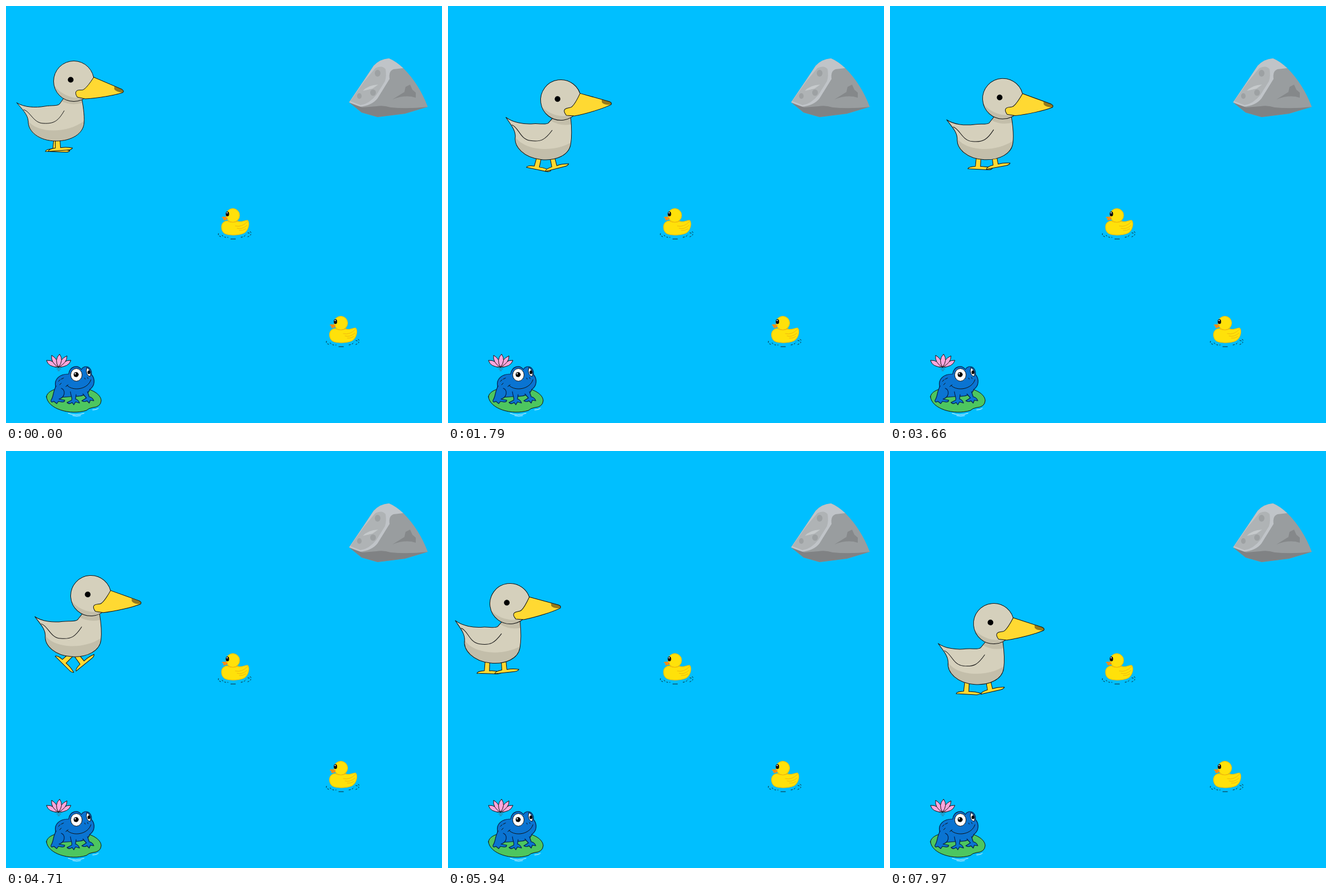
Recreate the animation shown at these times as an HTML page. Size 765 by 732 pixels, loop 8 s.

```html
<!DOCTYPE html>
<html lang="en">
<head>
<meta charset="utf-8">
<title>Duck pond</title>
<style>
  html, body { margin: 0; width: 100%; height: 100%; overflow: hidden; background: #00bfff; }
  svg { display: block; width: 100%; height: 100%; }
  .ink { stroke: #111; stroke-width: 1; stroke-linejoin: round; stroke-linecap: round; }
  .line { fill: none; }
  .cream { fill: #d5d0bc; }
  .shade { fill: #c3beaa; }
  .gold { fill: #ffd932; }
  .blue { fill: #0a74d2; stroke: #06204a; stroke-width: 1.2; }
  .pink { fill: #fda6dc; }
</style>
</head>
<body>
<svg viewBox="0 0 765 732">
  <defs>
    <path id="foot" class="ink gold" d="M-18 0 Q-17 -4 -5 -5 L-4 -23 H4 L4 -5 Q14 -6 25 -3 Q23 0 17 0 Z"/>
    <g id="duckling">
      <g fill="none" stroke="#10242c" stroke-dasharray="3 2.5">
        <path d="M373 399 Q371 403 377 405 M379 402 Q382 407 390 406 M412 406 Q420 405 421 400 M424 398 Q436 401 422 406 M428 396 L432 399"/>
        <path d="M394 409 H403" stroke-dasharray="none"/>
      </g>
      <g fill="#ffe10a" stroke="#f0b90a">
        <path d="M378 388 C378 380 384 377 390 377 L406 378 C414 380 419 376 424 376 C428 380 426 391 421 396 C416 403 390 404 383 399 Q378 395 378 388Z"/>
        <circle cx="398" cy="367.5" r="12"/>
        <path class="line" d="M389 378 Q399 382 408 377 M402 386 Q414 389 424 378 M405 390 Q414 393 423 385 M409 394 Q416 395 421 391"/>
      </g>
      <path d="M378 371 Q384 368 389 372 Q388 377 381 376 Q383 373 378 371Z" fill="#ff8c14"/>
      <ellipse cx="388.5" cy="365" rx="3" ry="4.3" fill="#111"/>
      <circle cx="388" cy="363" r="1.1" fill="#fff"/>
    </g>
  </defs>

  <g id="rock">
    <path fill="#999d9f" d="M602 169 L627 132 L645 105 Q656 93 672 92 Q684 97 697 109 Q725 137 740 177 L700 189 L652 195 L624 187Z"/>
    <path fill="#c0c4c8" d="M602 169 L627 132 L645 105 Q656 93 672 92 Q684 97 697 109 L680 111 Q671 114 673 128 L652 162 Q642 175 620 177Z"/>
    <path fill="#afb3b5" d="M604 167 L628 133 L648 109 Q660 103 666 111 Q668 122 665 132 L650 156 Q637 172 622 174Z"/>
    <path fill="#808284" d="M603 170 L625 178 L650 176 Q662 174 675 178 Q705 181 740 177 L700 189 L652 195 L624 187Z"/>
    <path fill="#85888a" d="M678 164 L699 151 L701 142 L709 138 L713 147 L719 152 V161 Q701 155 678 164Z"/>
    <path fill="#c6cacc" d="M626 149 Q635 139 653 138 L643 145Z"/>
    <g fill="#9da1a3">
      <ellipse cx="652" cy="118" rx="5" ry="6"/>
      <ellipse cx="644" cy="152" rx="5" ry="5.5"/>
      <ellipse cx="620" cy="158" rx="4" ry="5"/>
    </g>
  </g>

  <use href="#duckling"/>
  <use href="#duckling" x="189.5" y="189"/>

  <g id="frog" class="ink">
    <path d="M109 715 Q122 720 137 715 M117 719 Q124 721 131 719 M152 709 Q159 709 162 706" class="line" stroke="#e4f4ff"/>
    <path fill="#4dc65f" d="M71 686 C72 674 95 668 119 669 C148 669 167 681 167 693 Q166 704 152 705 Q145 706 141 710 C112 719 73 707 71 686Z"/>
    <path class="line" stroke="#506070" d="M86 634 H98 M89 637 H96 M91 640 H94"/>
    <g class="pink">
      <path d="M92 634 Q74 634 71 622 Q84 621 92 634Z"/>
      <path d="M92 634 Q110 634 114 622 Q102 621 92 634Z"/>
      <path d="M92 634 Q78 626 80 613 Q92 620 92 634Z"/>
      <path d="M92 634 Q108 626 107 614 Q94 620 92 634Z"/>
      <path d="M92 634 Q84 621 94 611 Q102 622 92 634Z"/>
    </g>
    <g class="blue">
      <path d="M87 668 C84 655 94 646 110 646 C112 632 126 629 132 638 C139 628 151 634 150 647 C157 655 156 667 147 673 C145 681 133 686 122 685 L96 687 Q86 684 87 668Z"/>
      <path d="M88 667 C82 677 84 685 79 692 Q78 697 84 694 L89 698 L92 694 Q103 697 103 692 L93 690 C105 686 104 674 97 671"/>
      <path d="M113 677 C114 686 117 689 115 692 L107 696 Q111 700 116 696 L119 700 L122 695 L129 697 Q127 691 122 690 L123 682"/>
      <path d="M135 681 L141 688 L133 693 Q138 696 142 693 L146 697 L148 692 L154 693 Q152 687 146 686 L143 677"/>
    </g>
    <path class="line" d="M107 666 C118 677 144 673 149 656 M105 668 L109 665 M138 653 L139 655 M143 652 L144 654 M92 659 L95 656 M97 655 L101 653 M94 665 L97 662"/>
    <ellipse cx="123.500" cy="647.500" rx="10" ry="11" fill="#fff"/>
    <path d="M142 635 Q150 639 148 650 Q142 650 141 641Z" fill="#fff"/>
    <circle cx="123" cy="647" r="4"/>
    <ellipse cx="145.500" cy="643" rx="2" ry="3"/>
    <circle cx="121.500" cy="645.500" r="1.200" fill="#fff" stroke="none"/>
  </g>

  <g id="duck">
    <use id="rear" href="#foot"/>
    <use id="front" href="#foot"/>
    <g id="body">
      <path class="cream" d="M19 170 C32 178 52 179 68 176 C80 174 90 176 94 172 L104 158 H132 C135 172 138 190 137 205 C136 224 115 237 88 237 C58 237 38 220 39 202 C38 190 28 181 19 170Z"/>
      <path class="shade" d="M39 202 C55 223 105 225 137 202 C137 224 115 237 88 237 C58 237 38 222 39 202Z"/>
      <path class="shade" d="M97 167 L104 158 H132 L134 170 Q115 176 97 167Z"/>
      <path class="ink line" d="M19 170 C32 178 52 179 68 176 C80 174 90 176 94 172 L104 158 H132 C135 172 138 190 137 205 C136 224 115 237 88 237 C58 237 38 220 39 202 C38 190 28 181 19 170Z M31 182 C43 185 48 206 66 206 C85 207 92 201 102 184"/>
    </g>
    <g id="head">
      <circle class="cream" cx="119" cy="132" r="35.500"/>
      <path class="shade" d="M84 139 A35.500 35.500 0 0 0 139 161 C116 164 97 156 84 139Z"/>
      <circle class="ink line" cx="119" cy="132" r="35.500"/>
      <circle cx="113.500" cy="129.500" r="5"/>
      <path class="gold" d="M154 125 L203 146 Q208 149 205 152 C190 157 160 162 139 163 L125 160 Q120 152 124 149 C128 146 134 149 137 146 Q143 142 154 125Z"/>
      <path fill="#94791d" d="M190 141 L203 146 Q208 149 205 152 Q193 151 190 146Z"/>
      <path class="ink line" d="M154 125 L203 146 Q208 149 205 152 C190 157 160 162 139 163 L125 160 Q120 152 124 149 C128 146 134 149 137 146 Q143 142 154 125Z"/>
    </g>
  </g>
</svg>
<script>
const LOOP = 8000, FPS = 13, HOME = [119, 132];

// tick, head centre x, y
const route = [
  [0, 119, 132], [3, 95, 101], [4, 117, 130], [5, 117, 130], [8, 93, 101], [10, 90, 103],
  [13, 92, 113], [17, 135, 128], [21, 184, 162], [23, 198, 165], [26, 236, 132], [27, 236, 132],
  [29, 230, 136], [31, 200, 122], [32, 200, 122], [34, 197, 136], [39, 172, 180], [43, 168, 163],
  [44, 184, 170], [45, 184, 170], [48, 205, 159], [49, 205, 159], [53, 157, 204], [54, 157, 204],
  [56, 175, 225], [58, 146, 250], [59, 146, 250], [61, 149, 254], [66, 110, 211], [70, 72, 229],
  [71, 74, 245], [72, 74, 245], [77, 109, 268], [81, 124, 284], [86, 110, 242], [90, 121, 277],
  [94, 152, 270], [99, 187, 314], [103, 182, 303]
];

// tick, walk cycles done
const gait = [[0, 0], [13, 1.47], [34, 3.77], [61, 6.77], [77, 8.5], [90, 10], [103, 11.3]];

// cycle phase, then x, y, angle of the rear and the front foot
const steps = [
  [0, 87, 256, 2, 92, 254, -4],
  [.3, 71, 256, 3, 114, 252, -13],
  [.49, 79, 255, 0, 110, 253, -5],
  [.77, 69, 251, 45, 107, 253, -39],
  [1, 87, 256, 2, 92, 254, -4]
];

function sample(keys, t) {
  let i = 1;
  while (i < keys.length - 1 && keys[i][0] < t) i++;
  const a = keys[i - 1], b = keys[i];
  const k = Math.min(1, (t - a[0]) / (b[0] - a[0]));
  return a.slice(1).map((v, j) => v + (b[j + 1] - v) * k);
}

function place(id, transform) {
  document.getElementById(id).setAttribute("transform", transform);
}

function draw(now) {
  const tick = Math.floor(now % LOOP * FPS / 1000);
  const [x, y] = sample(route, tick);
  const phase = sample(gait, tick)[0] % 1;
  const turn = phase * 2 * Math.PI;
  const nod = 4 * Math.cos(turn) - 4;
  const sink = 2.5 * Math.sin(turn) ** 2;
  const [rx, ry, ra, fx, fy, fa] = sample(steps, phase);
  place("duck", `translate(${x - HOME[0]} ${y - HOME[1]})`);
  place("head", `rotate(${nod} ${HOME})`);
  place("body", `translate(0 ${sink}) rotate(${-.8 * nod} 95 200)`);
  place("rear", `translate(${rx} ${ry}) rotate(${ra})`);
  place("front", `translate(${fx} ${fy}) rotate(${fa})`);
}

const start = performance.now();
function loop() {
  draw(performance.now() - start);
  requestAnimationFrame(loop);
}
loop();
</script>
</body>
</html>
```
